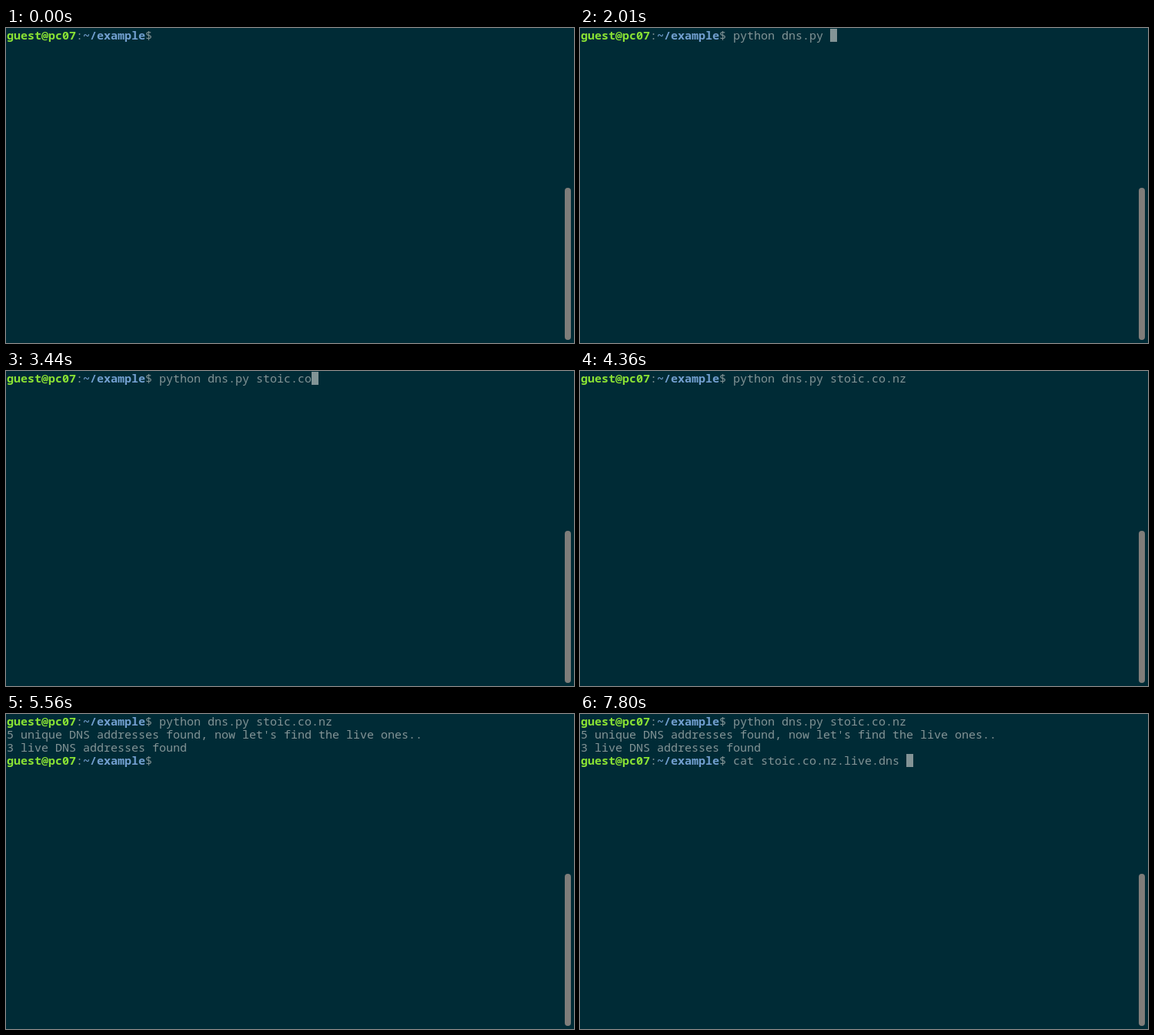
These frames come from a looping animation (738 px wide and 410 px high, 8000 ms). An HTML page:

```html
<!DOCTYPE html>
<html lang="en">
<head>
<meta charset="utf-8">
<title>Terminal</title>
<style>
  html, body { margin: 0; width: 100%; height: 100%; overflow: hidden; background: #002b36; }
  svg { display: block; width: 738px; height: 410px; }
  text { font: 15px "Noto Sans Mono", "DejaVu Sans Mono", monospace; fill: #839496; white-space: pre; }
  .user { font-weight: 700; fill: #8ae234; }
  .path { font-weight: 700; fill: #729fcf; }
</style>
</head>
<body>
<svg id="stage" viewBox="0 0 738 410">
  <rect width="738" height="410" fill="#002b36"/>
  <rect x="726" y="208" width="8" height="198" rx="4" fill="#7f7d7a"/>
</svg>
<script>
const LOOP = 8000, CELL = 9, ROW = 17, LEFT = 1, TOP = 1, BASELINE = 14;
const stage = document.getElementById("stage");
const col = n => LEFT + n * CELL;
const rowTop = n => TOP + n * ROW;

function add(tag, attrs, content = "") {
  const node = document.createElementNS("http://www.w3.org/2000/svg", tag);
  for (const key in attrs) node.setAttribute(key, attrs[key]);
  node.textContent = content;
  return stage.appendChild(node);
}

const addText = (row, column, content = "", cls = "") =>
  add("text", { x: col(column), y: rowTop(row) + BASELINE, class: cls }, content);

function addPrompt(row) {
  return [
    addText(row, 0, "guest@pc07", "user"),
    addText(row, 10, ":"),
    addText(row, 11, "~/example", "path"),
    addText(row, 20, "$")
  ];
}

const INPUT = 22;
addPrompt(0);
const secondPrompt = addPrompt(3);
const command = [addText(0, INPUT), addText(3, INPUT)];
const output = [
  addText(1, 0, "5 unique DNS addresses found, now let's find the live ones.."),
  addText(2, 0, "3 live DNS addresses found")
];
const cursor = add("rect", { width: CELL, height: ROW, fill: "#839496" });

// [time in ms, text after the prompt]
const first = [
  [0, ""], [380, "p"], [680, "py"], [850, "pyth"], [1010, "python"],
  [1540, "python "], [1730, "python d"], [1870, "python dn"], [2010, "python dns.py "]
];
const second = [
  [0, ""], [5710, "c"], [5850, "ca"], [6000, "cat"], [6200, "cat "],
  [6360, "cat s"], [6510, "cat sto"], [6660, "cat stoi"], [6800, "cat stoic.co.nz."],
  [7700, "cat stoic.co.nz.l"], [7800, "cat stoic.co.nz.live.dns "]
];

// Single key presses at an even pace
function type(steps, word, start, end) {
  const base = steps[steps.length - 1][1];
  const gap = (end - start) / (word.length - 1);
  for (let i = 0; i < word.length; i++) {
    steps.push([start + i * gap, base + word.slice(0, i + 1)]);
  }
}
type(first, "stoi", 2630, 2930);
type(first, "c.co.nz", 3020, 3670);

const ENTER = 3810, FIRST_LINE = 5110, DONE = 5230;
const cursorOff = [[0, 380], [4360, 4990], [5560, 5710], [7370, 7700]];

const typedAt = (steps, t) => steps.filter(([at]) => at <= t).pop()[1];
const show = (node, on) => node.setAttribute("visibility", on ? "visible" : "hidden");

function cursorCell(t, typed) {
  if (t < ENTER) return [0, INPUT + typed[0].length];
  if (t < FIRST_LINE) return [1, 0];
  if (t < DONE) return [2, 0];
  return [3, INPUT + typed[1].length];
}

function draw(t) {
  const typed = [typedAt(first, t), typedAt(second, t)];
  command.forEach((node, i) => { node.textContent = typed[i]; });
  show(output[0], t >= FIRST_LINE);
  show(output[1], t >= DONE);
  secondPrompt.forEach(node => show(node, t >= DONE));

  const [row, column] = cursorCell(t, typed);
  cursor.setAttribute("x", col(column));
  cursor.setAttribute("y", rowTop(row));
  show(cursor, !cursorOff.some(([from, to]) => t >= from && t < to));
}

const began = performance.now();
function tick() {
  draw((performance.now() - began) % LOOP);
  requestAnimationFrame(tick);
}
tick();
</script>
</body>
</html>
```
